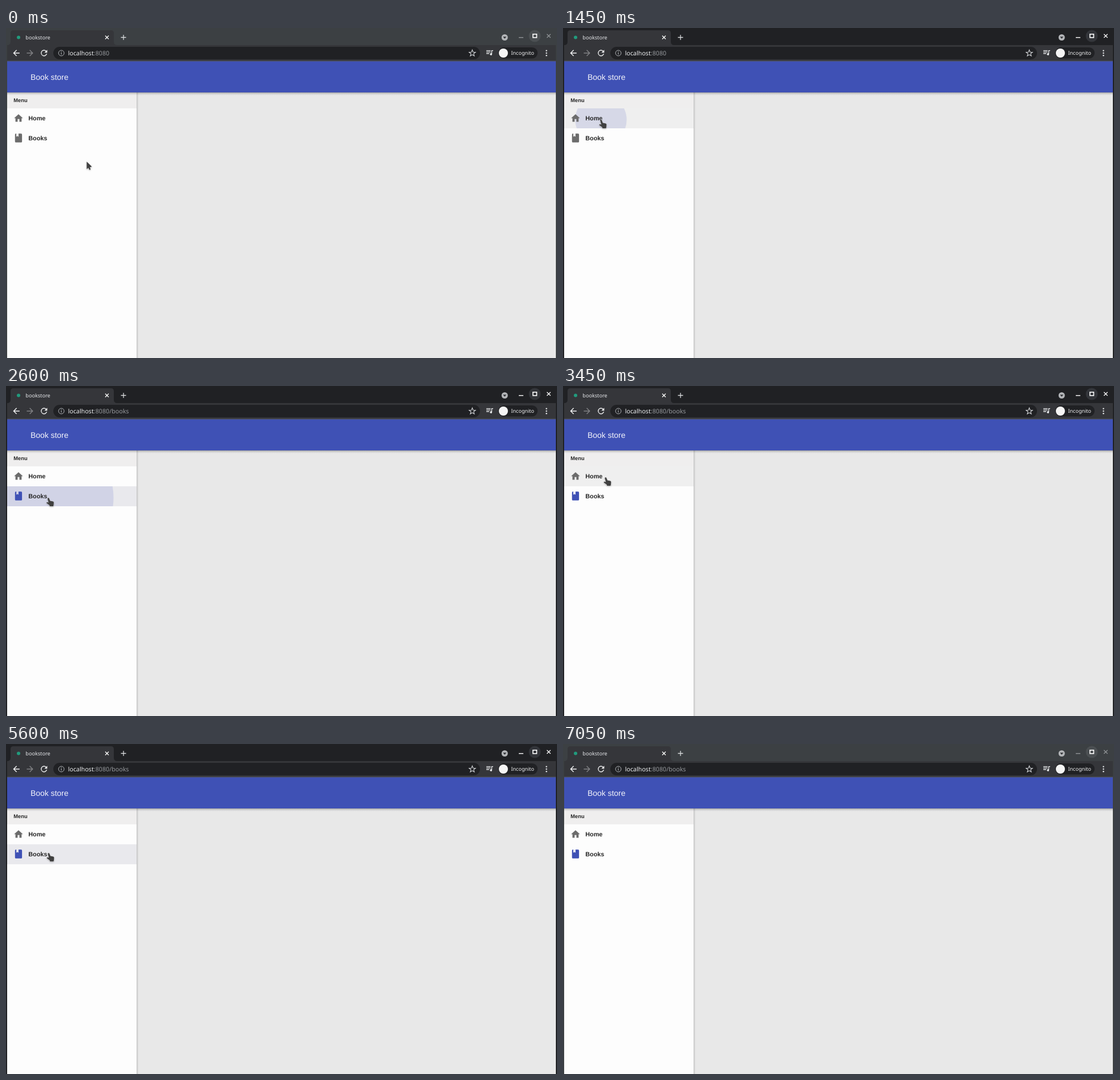
These frames come from a looping animation (966 px wide and 579 px high, 7.15 s). An HTML page:

```html
<!DOCTYPE html>
<html lang="en">
<head>
<meta charset="utf-8">
<title>Book store</title>
<style>
  html, body { margin: 0; width: 100%; height: 100%; overflow: hidden; background: #e8e8e8; }
  svg { display: block; width: 100vw; height: 100vh; text-rendering: geometricPrecision; }
  .ui { font-family: "Noto Sans", sans-serif; }
  .app { font-family: "Liberation Sans", Arial, sans-serif; }
  .bold { font-weight: bold; fill: #272727; }
  .line { fill: none; stroke: #fff; }
  #frame { fill: #3c4043; }
  #halo { fill: #4b4f52; }
  .ctl { stroke: #8d9093; }
  .active #frame { fill: #202124; }
  .active #halo { fill: #33353a; }
  .active .ctl { stroke: #f4f4f4; }
  .icon { fill: #6c6c6c; }
  .icon.on { fill: #3f51b5; }
  #star { fill: none; stroke: #d5d7da; stroke-width: 1.1; }
  #star.on { fill: #468af5; stroke: #468af5; }
  #pointer path { fill: #404040; stroke: #fff; stroke-opacity: .65; stroke-width: .7; paint-order: stroke; }
  #pointer { filter: drop-shadow(.5px 1px 1px rgba(0, 0, 0, .3)); }
</style>
</head>
<body>
<svg id="stage" viewBox="0 0 966 579" preserveAspectRatio="none">
  <defs>
    <linearGradient id="down" x2="0" y2="1">
      <stop stop-opacity=".32"/><stop offset=".4" stop-opacity=".12"/><stop offset="1" stop-opacity="0"/>
    </linearGradient>
    <linearGradient id="side">
      <stop stop-opacity=".2"/><stop offset=".4" stop-opacity=".07"/><stop offset="1" stop-opacity="0"/>
    </linearGradient>
    <clipPath id="clip0"><rect x="2" y="141" width="227" height="35"/></clipPath>
    <clipPath id="clip1"><rect x="2" y="176" width="227" height="35"/></clipPath>
  </defs>

  <rect id="frame" width="966" height="579"/>

  <!-- page -->
  <rect x="2" y="59" width="962" height="520" fill="#e8e8e8"/>
  <rect x="2" y="113" width="227" height="466" fill="#fdfdfd"/>
  <rect x="229" y="113" width="4" height="466" fill="url(#side)"/>
  <rect x="2" y="113" width="227" height="28" fill="#efeeee"/>
  <rect id="row0" x="2" y="141" width="227" height="35"/>
  <rect id="row1" x="2" y="176" width="227" height="35"/>
  <circle id="ripple" fill="#3f51b5"/>
  <rect x="2" y="113" width="962" height="5" fill="url(#down)"/>
  <rect x="2" y="58" width="962" height="55" fill="#3f51b5"/>
  <g class="app">
    <text x="43" y="91" font-size="13.9" fill="#f4f5fb">Book store</text>
    <text class="bold" x="13.3" y="129.5" font-size="9.3">Menu</text>
    <text class="bold" x="39.3" y="162" font-size="10.8">Home</text>
    <text class="bold" x="39.3" y="197" font-size="10.8">Books</text>
  </g>
  <path id="icon0" class="icon" transform="translate(12.7 149) scale(.77)"
    d="M10 20v-6h4v6h5v-8h3L12 3 2 12h3v8z"/>
  <path id="icon1" class="icon" transform="translate(12.7 183.8) scale(.77)"
    d="M18 22a2 2 0 0 0 2-2V4a2 2 0 0 0-2-2h-6v7L9.500 7.500 7 9V2H6a2 2 0 0 0-2 2v16a2 2 0 0 0 2 2z"/>

  <!-- tab strip -->
  <path d="M2 30Q8 30 8 24V9Q8 4 13 4H184Q189 4 189 9V24Q189 30 195 30H964V58H2Z" fill="#35363a"/>
  <rect x="2" y="57.500" width="962" height="1" fill="#55565c"/>
  <circle cx="22" cy="16.500" r="3" fill="#219b7d"/>
  <text class="ui" x="34.300" y="20" font-size="9.100" fill="#e4e6e9">bookstore</text>
  <path class="line" d="M174 13.500l6 6m0-6l-6 6" stroke-width="1.300"/>
  <path class="line" d="M201.500 16.500h9m-4.500-4.500v9" stroke-width="1.300" style="stroke:#d8dadc"/>
  <circle cx="874.300" cy="16.500" r="5.500" fill="#b3b5b8"/>
  <path d="M871.300 15.200h6l-3 3.600z" fill="#303236"/>
  <circle id="halo" cx="927" cy="14" r="10.500"/>
  <rect class="line" x="923.800" y="10.800" width="6.600" height="6" stroke-width="1.600"/>
  <path class="ctl" d="M899 16.700h8" stroke-width="1.500"/>
  <path class="ctl" d="M948.300 10.700l6.400 6.400m0-6.400l-6.400 6.400" stroke-width="1.400"/>

  <!-- toolbar -->
  <rect x="83" y="33" width="748" height="22" rx="11" fill="#202124"/>
  <path id="back" fill="#f3f4f5" transform="translate(9.600 35.400) scale(.71)"
    d="M20 11H7.830l5.590-5.590L12 4l-8 8 8 8 1.410-1.410L7.830 13H20z"/>
  <use href="#back" transform="matrix(-1 0 0 1 60.200 0)" opacity=".4"/>
  <path fill="#f3f4f5" transform="translate(58.300 35.500) scale(.7)"
    d="M17.650 6.350A8 8 0 1 0 19.730 14h-2.080A6 6 0 1 1 12 6c1.660 0 3.140.690 4.220 1.780L13 11h7V4z"/>
  <circle class="line" cx="97" cy="44" r="4.900" stroke-width="1" style="stroke:#b0b3b7"/>
  <path d="M97 43.200v3.400M97 41v1.200" stroke="#b0b3b7" stroke-width="1.200"/>
  <text class="ui" x="108.700" y="47.500" font-size="10.700" fill="#eceef0">localhost<tspan id="url" fill="#96999d"></tspan></text>
  <path id="star"/>
  <path fill="#e6e8ea" transform="translate(840.200 35.300) scale(.63)"
    d="M15 6H3v2h12zm0 4H3v2h12zM3 16h8v-2H3zM17 6v8.180a3 3 0 1 0 2 2.820V8h3V6z"/>
  <rect x="863" y="34" width="69" height="19.500" rx="9.750" fill="#202124"/>
  <circle cx="872" cy="44" r="8" fill="#f5f5f5"/>
  <text class="ui" x="885.500" y="47" font-size="9" fill="#f0f1f2">Incognito</text>
  <g fill="#eceef0">
    <circle cx="947.500" cy="39.800" r="1.200"/><circle cx="947.500" cy="44" r="1.200"/><circle cx="947.500" cy="48.200" r="1.200"/>
  </g>

  <g id="pointer">
    <path id="arrow" d="M.5 .5V13.600L3.500 11.300L5.300 15L7.500 14L5.800 10.500L9.500 9.300Z"/>
    <path id="hand" transform="translate(-3.700 0)"
      d="M3.200 .6Q4.600 -.2 5.300 1.200L7 5.600L12 6.600Q13.600 7 13.500 8.600L13.200 12.600L12.600 15H6.600L5.600 12.800L1 9.600Q.2 8.200 1.600 7.700L4.400 8.600L2.600 2Q2.400 1 3.200 .6Z"/>
  </g>
</svg>

<script>
const LOOP = 7150, TICK = 50;
const FOCUS = 1450, BLUR = 7050;
const ROW_TOP = 141, ROW_H = 35;

// pointer path: time, x, y
const MOVES = [
  [0, 141, 234], [350, 141, 234], [900, 66.5, 161],
  [1850, 66.5, 161], [2000, 74.5, 194], [2100, 74, 196],
  [3200, 74, 196], [3450, 74.5, 160],
  [4150, 74.5, 160], [4500, 74.5, 191],
  [6450, 74.5, 191], [6800, 47, -20], [LOOP, 47, -20]
];
// clicks: time, menu row
const CLICKS = [[1450, 0], [2500, 1], [3850, 0], [5100, 1]];
const PATHS = ["/home", "/books"];

const $ = id => document.getElementById(id);
const stage = $("stage"), ripple = $("ripple"), star = $("star");
const clamp = v => Math.min(1, Math.max(0, v));
const smooth = p => p * p * (3 - 2 * p);

star.setAttribute("d", "M" + Array.from({ length: 10 }, (_, i) => {
  const a = Math.PI * (i / 5 - .5), r = i % 2 ? 2.5 : 5.9;
  return (817.5 + r * Math.cos(a)).toFixed(2) + " " + (44.3 + r * Math.sin(a)).toFixed(2);
}).join("L") + "Z");

function pointerAt(t) {
  const i = Math.max(1, MOVES.findIndex(m => m[0] >= t));
  const [t0, x0, y0] = MOVES[i - 1], [t1, x1, y1] = MOVES[i];
  const p = smooth(clamp((t - t0) / (t1 - t0)));
  return [x0 + (x1 - x0) * p, y0 + (y1 - y0) * p];
}

function rowAt([x, y]) {
  const row = Math.floor((y - ROW_TOP) / ROW_H);
  return x > 2 && x < 229 && (row === 0 || row === 1) ? row : -1;
}

function lastClick(t) {
  return CLICKS.filter(c => c[0] <= t).pop();
}

function drawRipple(t) {
  const click = lastClick(t);
  const age = click ? t - click[0] + TICK : LOOP;
  const alpha = .14 * (1 - clamp((age - 250) / 300));
  ripple.setAttribute("opacity", alpha);
  if (!alpha) return;
  const [x, y] = pointerAt(click[0]);
  ripple.setAttribute("cx", x);
  ripple.setAttribute("cy", y);
  ripple.setAttribute("r", 170 * (1 - (1 - clamp(age / 350)) ** 2));
  ripple.setAttribute("clip-path", `url(#clip${click[1]})`);
}

function draw(t) {
  const pos = pointerAt(t);
  const hover = rowAt(pointerAt(Math.max(0, t - 100)));
  const click = lastClick(t - 100);
  const page = click ? click[1] : -1;

  stage.classList.toggle("active", t >= FOCUS && t < BLUR);
  for (const i of [0, 1]) {
    $("row" + i).setAttribute("fill", hover !== i ? "#fdfdfd" : page === i ? "#e9e9ed" : "#efefef");
    $("icon" + i).classList.toggle("on", page === i);
  }
  star.classList.toggle("on", page === 0);
  $("url").textContent = ":8080" + (PATHS[page] || "");
  drawRipple(t);

  const link = rowAt(pos) >= 0;
  $("hand").style.display = link ? "" : "none";
  $("arrow").style.display = link ? "none" : "";
  $("pointer").setAttribute("transform", `translate(${pos[0].toFixed(2)} ${pos[1].toFixed(2)})`);
}

const start = performance.now();
function tick() {
  const t = (performance.now() - start) % LOOP;
  draw(Math.floor(t / TICK) * TICK);
  requestAnimationFrame(tick);
}
tick();
</script>
</body>
</html>
```
